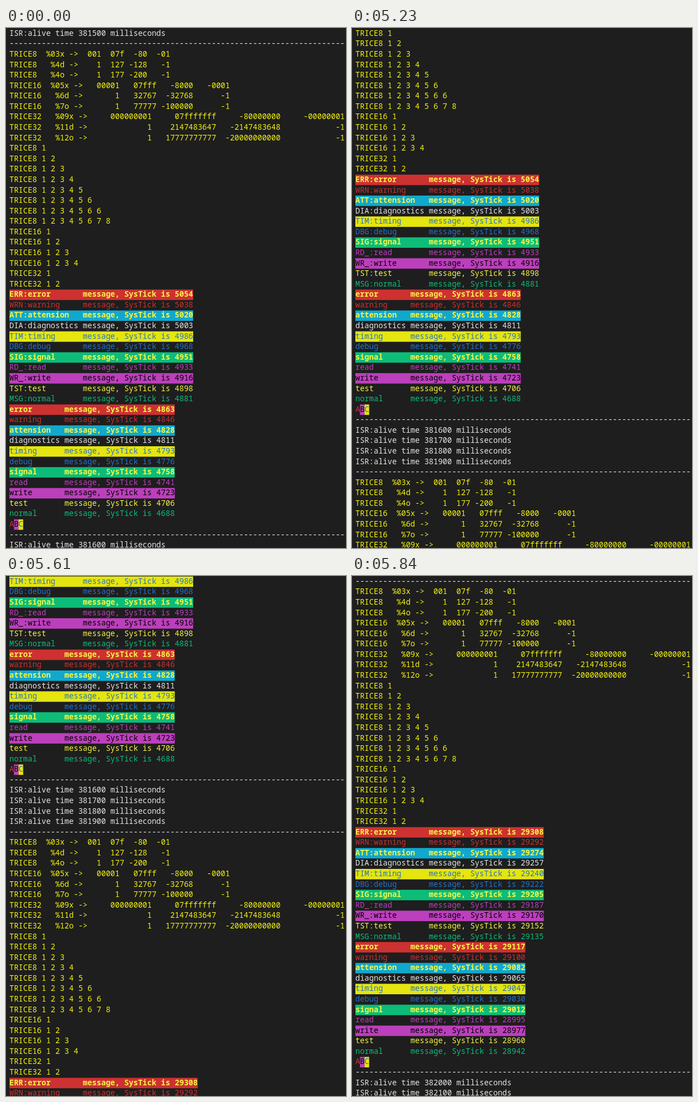
These frames come from a looping animation (605x925 px, 5920 ms). An HTML page with a canvas:

```html
<!DOCTYPE html>
<html lang="en">
<head>
<meta charset="utf-8">
<title>Terminal log</title>
<style>
  html, body { margin: 0; width: 100%; height: 100%; overflow: hidden; background: #1e1e1e; }
  canvas { display: block; }
</style>
</head>
<body>
<canvas id="term" width="605" height="925"></canvas>
<script>
const ctx = document.getElementById('term').getContext('2d');
const W = 605, H = 925, ROWS = 50, LEFT = 6;
const CELL = 8.175, PITCH = 18.58, BAR_TOP = 0.8, BASE = 13.8;
const FONT = '13.625px "Noto Sans Mono", "DejaVu Sans Mono", monospace';
const LOOP = 5920;

const C = {
  bg: '#1e1e1e', white: '#e5e5e5', black: '#000000',
  red: '#cd3131', green: '#0dbc79', yellow: '#e5e510', bright: '#f5f543',
  vivid: '#f2f20f', blue: '#2472c8', magenta: '#bc3fbc', cyan: '#11a8cd'
};

// tag, name, text colour, bar colour, bold
const KINDS = [
  ['ERR', 'error', C.bright, C.red, true],
  ['WRN', 'warning', C.red],
  ['ATT', 'attension', C.bright, C.cyan, true],
  ['DIA', 'diagnostics', C.white],
  ['TIM', 'timing', C.blue, C.yellow],
  ['DBG', 'debug', C.blue],
  ['SIG', 'signal', C.bright, C.green, true],
  ['RD_', 'read', C.magenta],
  ['WR_', 'write', C.black, C.magenta],
  ['TST', 'test', C.bright],
  ['MSG', 'normal', C.green]
];

const TICKS = [
  5054, 5038, 5020, 5003, 4986, 4968, 4951, 4933, 4916, 4898, 4881,
  4863, 4846, 4828, 4811, 4793, 4776, 4758, 4741, 4723, 4706, 4688
];

// bits, format end column, value width, then rows of format and values
const TABLES = [
  [8, 12, 5, ['%03x 001 07f -80 -01', '%4d 1 127 -128 -1', '%4o 1 177 -200 -1']],
  [16, 13, 8, ['%05x 00001 07fff -8000 -0001', '%6d 1 32767 -32768 -1',
    '%7o 1 77777 -100000 -1']],
  [32, 14, 14, ['%09x 000000001 07fffffff -80000000 -00000001',
    '%11d 1 2147483647 -2147483648 -1', '%12o 1 17777777777 -20000000000 -1']]
];

// each line is a list of spans
const lines = [];
const add = (text, color, bar, bold) => lines.push([{ text, color, bar, bold }]);
const addRule = () => add('-'.repeat(75), C.white);
const addAlive = ms => add(`ISR:alive time ${ms} milliseconds`, C.white);

function addTables() {
  for (const [bits, end, width, rows] of TABLES) {
    for (const row of rows) {
      const [format, ...values] = row.split(' ');
      const name = 'TRICE' + bits;
      const head = name + format.padStart(end - name.length) + ' ->';
      add(head + values.map(v => v.padStart(width)).join(''), C.vivid);
    }
  }
}

function addCounts() {
  for (const [bits, max] of [[8, 8], [16, 4], [32, 2]]) {
    for (let n = 1; n <= max; n++) {
      const nums = Array.from({ length: n }, (_, i) => i + 1);
      if (n === 7) nums[6] = 6;
      add(`TRICE${bits} ${nums.join(' ')}`, C.vivid);
    }
  }
}

function addMessages(shift) {
  TICKS.forEach((tick, i) => {
    const [tag, name, color, bar, bold] = KINDS[i % 11];
    const label = i < 11 ? `${tag}:${name}`.padEnd(16) : name.padEnd(12);
    add(`${label}message, SysTick is ${tick + shift}`, color, bar, bold);
  });
  lines.push([
    { text: 'A', color: C.red },
    { text: 'B', color: C.black, bar: C.magenta },
    { text: 'C', color: C.blue, bar: C.yellow }
  ]);
}

function addBlock(shift) {
  addRule();
  addTables();
  addCounts();
  addMessages(shift);
  addRule();
}

addAlive(381500);
addBlock(0);
for (let ms = 381600; ms <= 381900; ms += 100) addAlive(ms);
addBlock(24254);
addAlive(382000);
addAlive(382100);

// time in ms, first visible line
const SCROLL = [
  [0, 0], [5000, 4], [5070, 6], [5150, 9], [5230, 11], [5380, 15],
  [5460, 19], [5530, 24], [5610, 29], [5690, 40], [5760, 50], [5840, 53]
];

function drawLine(spans, top) {
  let col = 0;
  for (const { text, color, bar, bold } of spans) {
    if (bar) {
      ctx.fillStyle = bar;
      ctx.fillRect(LEFT + col * CELL, top + BAR_TOP, text.length * CELL, PITCH);
    }
    ctx.font = (bold ? '600 ' : '500 ') + FONT;
    ctx.fillStyle = color;
    for (const ch of text) {
      if (ch !== ' ') ctx.fillText(ch, LEFT + col * CELL, top + BASE);
      col++;
    }
  }
}

let shown = -1;

function draw(first) {
  ctx.fillStyle = C.bg;
  ctx.fillRect(0, 0, W, H);
  for (let r = 0; r < ROWS; r++) drawLine(lines[first + r], r * PITCH);
}

function tick() {
  const t = performance.now() % LOOP;
  const first = SCROLL.filter(step => step[0] <= t).pop()[1];
  if (first !== shown) draw(shown = first);
  requestAnimationFrame(tick);
}
tick();
</script>
</body>
</html>
```
